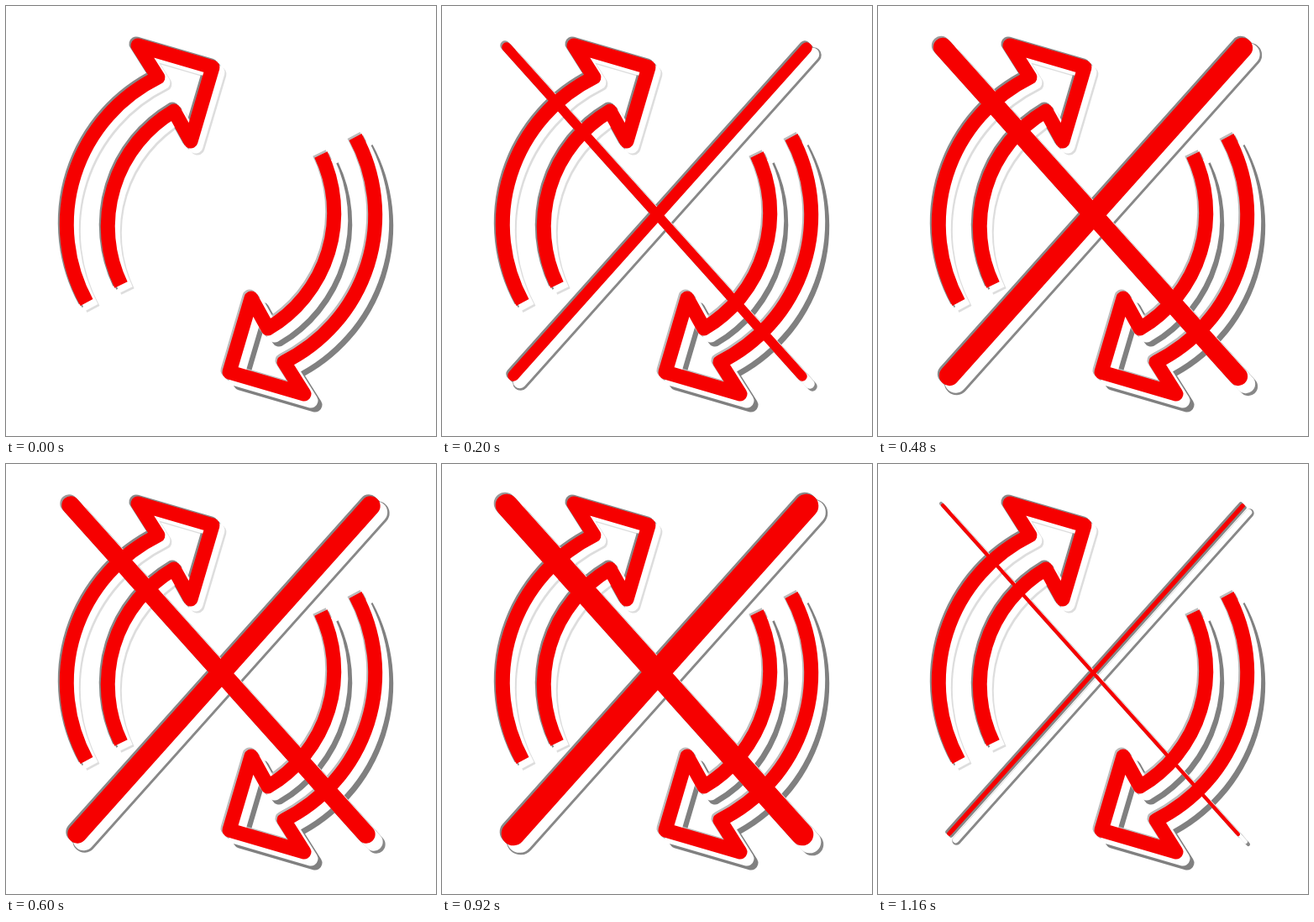
These frames come from a looping animation (512 px wide and 512 px high, 1200 ms). An HTML page with a canvas:

```html
<!DOCTYPE html>
<html>
<head>
<meta charset="utf-8">
<style>
html, body { margin: 0; width: 100%; height: 100%; overflow: hidden; background: #fff; }
canvas { display: block; width: 100%; height: 100%; }
</style>
</head>
<body>
<canvas id="stage" width="512" height="512"></canvas>
<script>
const ctx = document.getElementById('stage').getContext('2d');
const LOOP = 1200, STEP = 40;

const arrow = new Path2D(
  'M96 353A195 195 0 0 1 181 85L157 47L246 73L220 161L200 125A160 160 0 0 0 137 332');
const turned = new Path2D();
turned.addPath(arrow, new DOMMatrix([-1, 0, 0, -1, 512, 509]));
const rising = new Path2D('M85 440L434 50');
const falling = new Path2D('M77 49L429 441');

// Stroke width of the cross over time: [ms, px]
const keys = [[0, 0], [400, 23], [640, 21], [940, 27], [1200, 0]];

function crossWidth(t) {
  const i = keys.findIndex(k => k[0] > t);
  const [t0, w0] = keys[i - 1], [t1, w1] = keys[i];
  return w0 + (w1 - w0) * (t - t0) / (t1 - t0);
}

function stroke({ path, width, cap }, color, shift = 0, pad = 0) {
  if (!width) return;
  ctx.save();
  ctx.translate(shift, shift);
  ctx.strokeStyle = color;
  ctx.lineWidth = width + pad;
  ctx.lineCap = cap;
  ctx.lineJoin = 'round';
  ctx.stroke(path);
  ctx.restore();
}

function draw(now) {
  const t = Math.floor(now % LOOP / STEP) * STEP;
  const w = crossWidth(t);
  // far: dark shadow offset, near: white shadow offset, pad: extra shadow width
  const shapes = [
    { path: arrow, width: 17, cap: 'butt', glow: '#888', edge: '#ddd', far: 8, near: 6, pad: 0 },
    { path: turned, width: 17, cap: 'butt', glow: '#bbb', edge: '#808080', far: 13, near: 8, pad: 0 },
    { path: rising, width: w + Math.min(2, w / 3), cap: 'round',
      glow: '#888', edge: '#888', far: 8.5, near: 7.5, pad: 5 },
    { path: falling, width: w, cap: 'round', glow: '#999', edge: '#888', far: 12, near: 9, pad: 0 }
  ];

  ctx.fillStyle = '#fff';
  ctx.fillRect(0, 0, 512, 512);
  for (const s of shapes) {
    stroke(s, s.edge, s.far, s.pad);
    stroke(s, s.glow, -2);
    stroke(s, s.glow, 2);
  }
  for (const s of shapes) stroke(s, '#fff', s.near, s.pad * 0.4);
  for (const s of shapes) stroke(s, '#f60000');
  requestAnimationFrame(draw);
}
requestAnimationFrame(draw);
</script>
</body>
</html>
```
